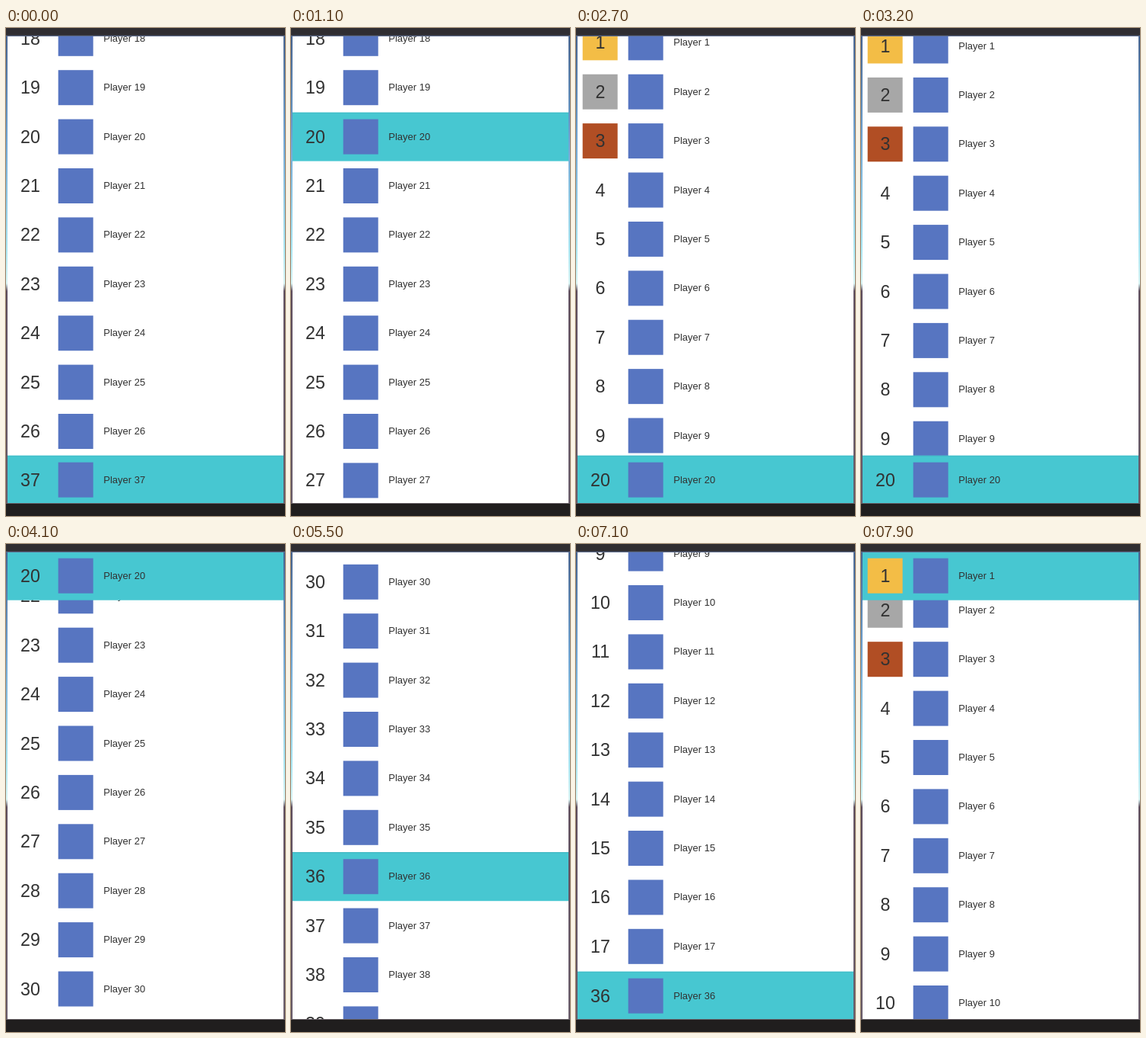
An HTML page for the animation above (8000 ms loop, 367x640 px).

```html
<!DOCTYPE html>
<html lang="en">
<head>
<meta charset="utf-8">
<title>Leaderboard</title>
<style>
html, body { margin: 0; width: 100%; height: 100%; overflow: hidden; }
body { background: #201f1f; }
.stage {
  position: relative; width: 367px; height: 640px; overflow: hidden;
  background:
    linear-gradient(#2f2d31 0 9px, #3d3d45 9px 10px, #5a6a8c 10px 11px, transparent 11px),
    linear-gradient(transparent 623px, #655d63 623px 624px, #201e1e 624px),
    linear-gradient(#44628f 10px, #6fa5d4 150px, #a9e6f2 290px, #d8f4f4 335px, #5d4c5c 345px, #675a68 623px);
}
.panel {
  position: absolute; left: 2px; top: 11px; width: 363px; height: 612px;
  overflow: hidden; background: #fff;
}
.row {
  position: absolute; left: -2px; top: -11px; width: 367px; height: 64px;
  font: 13px/64px "Liberation Sans", Arial, sans-serif; color: #323232;
}
.row > * { position: absolute; top: 0.4px; white-space: nowrap; }
.row .box { top: 9px; width: 46px; height: 46px; transform: translateX(-0.3px); }
.badge { left: 9px; }
.avatar { left: 69px; background: #5775c1; }
.rank { left: 9px; width: 46px; text-align: center; font-size: 23.3px; }
.name { left: 128.3px; }
.row.on { z-index: 1; background: #47c7d1; box-shadow: inset 0 1px #3fb3bf; }
</style>
</head>
<body>
<div class="stage"><div class="panel" id="panel"></div></div>
<script>
const LOOP = 8000, STEP = 100, COUNT = 40, PITCH = 64.4, HALF = 31.8;
const TOP = 41.5, BOTTOM = 592.4;
const MEDALS = ['#f3bd46', '#a7a7a7', '#b14e24'];

// [ms, centre of the first row]
const SCROLL = [
  [0, -1081.2], [1700, -1081.2], [2100, -455.2], [2500, -45], [2900, 46],
  [3200, 23.3], [3500, -240], [4100, -1284.3], [4600, -1818], [5700, -1818],
  [6300, -934.5], [6600, -600], [7000, -600], [7400, 22.2], [LOOP, 22.2]
];
// [ms, selected player]
const PICKS = [[0, 37], [1100, 20], [5500, 36], [7900, 1]];

const secant = i => (SCROLL[i + 1][1] - SCROLL[i][1]) / (SCROLL[i + 1][0] - SCROLL[i][0]);

// Monotone tangents: flat at turning points and rests
const slopes = SCROLL.map((p, i) => {
  if (i === 0 || i === SCROLL.length - 1) return 0;
  const a = secant(i - 1), b = secant(i);
  return a * b > 0 ? 2 * a * b / (a + b) : 0;
});

function scrollAt(t) {
  let i = 0;
  while (i < SCROLL.length - 2 && t >= SCROLL[i + 1][0]) i++;
  const [t0, y0] = SCROLL[i], [t1, y1] = SCROLL[i + 1];
  const h = t1 - t0, u = (t - t0) / h, v = 1 - u;
  return v * v * ((1 + 2 * u) * y0 + u * h * slopes[i]) +
         u * u * ((3 - 2 * u) * y1 - v * h * slopes[i + 1]);
}

const pickAt = t => PICKS.filter(p => p[0] <= t).pop()[1];

function add(parent, cls, text = '') {
  const el = document.createElement('div');
  el.className = cls;
  el.textContent = text;
  return parent.appendChild(el);
}

const panel = document.getElementById('panel');
const rows = Array.from({ length: COUNT }, (_, i) => {
  const row = add(panel, 'row');
  if (MEDALS[i]) add(row, 'box badge').style.background = MEDALS[i];
  add(row, 'rank', i + 1);
  add(row, 'box avatar');
  add(row, 'name', 'Player ' + (i + 1));
  return row;
});

function draw(t) {
  const first = scrollAt(t), pick = pickAt(t);
  rows.forEach((row, i) => {
    const on = i + 1 === pick;
    let y = first + i * PITCH;
    if (on) y = Math.min(BOTTOM, Math.max(TOP, y));
    row.classList.toggle('on', on);
    row.style.transform = `translateY(${(y - HALF).toFixed(2)}px)`;
  });
}

const start = performance.now();
function tick() {
  const t = (performance.now() - start) % LOOP;
  draw(Math.floor(t / STEP) * STEP);
  requestAnimationFrame(tick);
}
tick();
</script>
</body>
</html>
```
